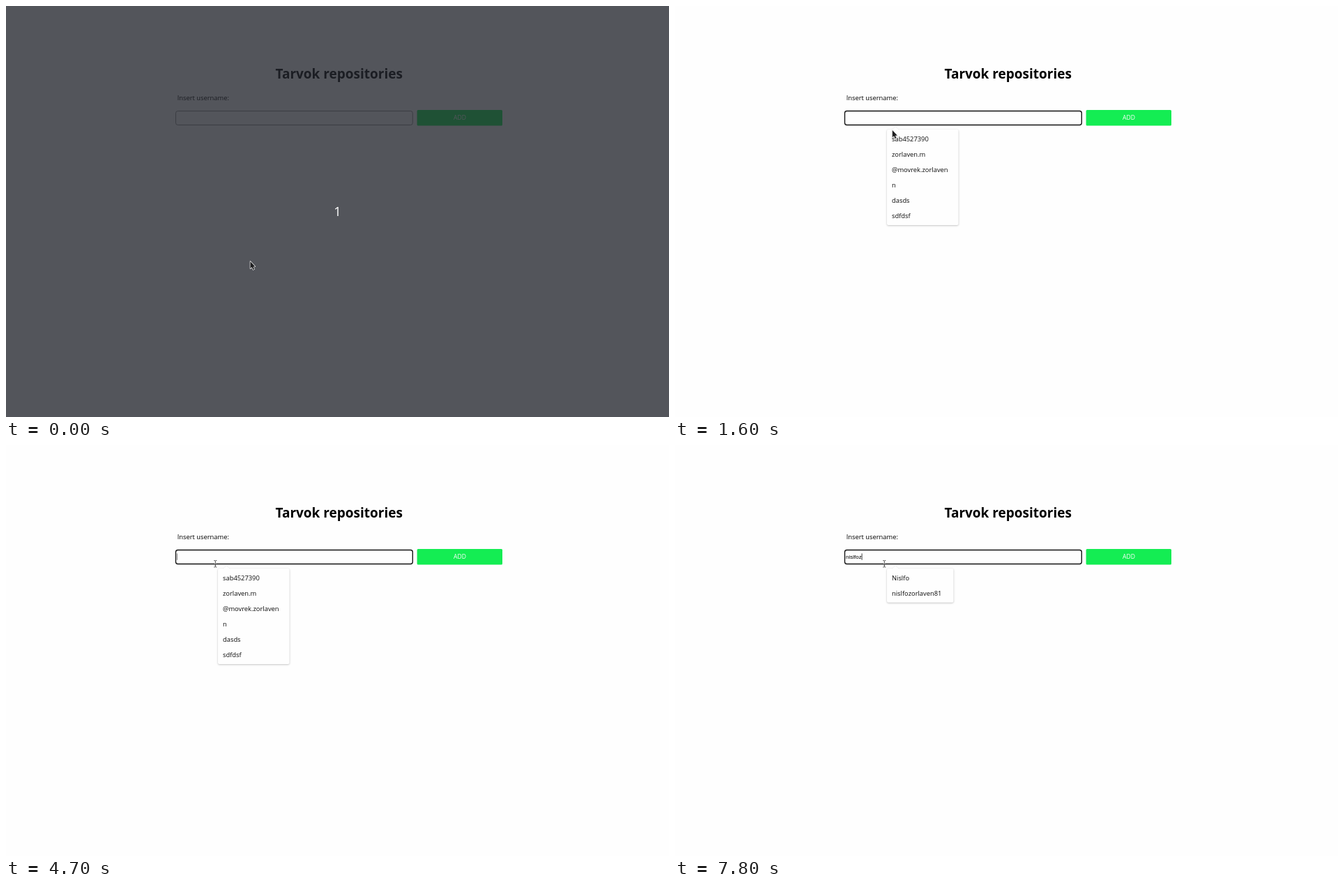
An HTML page with a canvas that plays this animation: 951x589 px, repeating every 8000 ms.

```html
<!DOCTYPE html>
<html lang="en">
<head>
<meta charset="utf-8">
<title>Repositories</title>
<style>
  html, body { margin: 0; width: 100%; height: 100%; overflow: hidden; background: #fefefe; }
  canvas { display: block; }
</style>
</head>
<body>
<canvas id="stage" width="951" height="589"></canvas>
<script>
const ctx = document.getElementById('stage').getContext('2d');
const LOOP = 8000;
const SANS = '"Open Sans", "Noto Sans", sans-serif';
const LABEL = '500 9.35px ' + SANS;
const INPUT = '8px "Liberation Sans", Arial, sans-serif';

const USER = 'nislfozorlaven81';
const ALL = ['sab4527390', 'zorlaven.m', '@movrek.zorlaven', 'n', 'dasds', 'sdfdsf'];
const MATCHES = ['n', 'Nislfo', USER];

// [start ms, value]; each value holds until the next entry
const typed = [[0, 0], [5600, 1], [6400, 2], [6800, 4], [7100, 5], [7400, 6], [7800, 7]];
const caretOn = [[0, false], [1100, true], [1600, false], [2200, true], [2800, false],
  [3500, true], [4100, false], [4700, true], [5400, false], [5600, true]];
const popup = [[0, null], [1200, { items: ALL, width: 102.6 }],
  [5600, { items: MATCHES, width: 95.5 }],
  [6500, { items: MATCHES.slice(1), width: 95.5 }]];

// pointer moves: start, end, from, to
const moves = [
  [100, 400, [350.4, 366], [367, 388.5]],
  [500, 800, [367, 388.5], [283.5, 160]],
  [1200, 1600, [283.5, 160], [311.8, 178]],
  [1900, 2200, [311.8, 178], [300.3, 170.3]]
];

function at(list, t) {
  let value = list[0][1];
  for (const [start, v] of list) if (t >= start) value = v;
  return value;
}

function pointer(t) {
  let pos = moves[0][2];
  for (const [start, end, a, b] of moves) {
    if (t < start) break;
    const p = Math.min(1, (t - start) / (end - start));
    const e = p * p * (3 - 2 * p);
    pos = a.map((v, i) => v + (b[i] - v) * e);
  }
  return pos;
}

function text(str, x, y, font, color, align = 'left') {
  ctx.font = font;
  ctx.fillStyle = color;
  ctx.textAlign = align;
  ctx.fillText(str, x, y);
}

function box(x, y, w, h, r) {
  ctx.beginPath();
  ctx.roundRect(x, y, w, h, r);
}

function shadow(color, blur, dy) {
  ctx.shadowColor = color;
  ctx.shadowBlur = blur;
  ctx.shadowOffsetY = dy;
}

function drawPage(focused) {
  ctx.fillStyle = '#fefefe';
  ctx.fillRect(0, 0, 951, 589);
  text('Tarvok repositories', 477.7, 104, 'bold 19px "Noto Sans", "Open Sans", sans-serif', '#000', 'center');
  text('Insert username:', 245.7, 135.4, LABEL, '#000');

  box(243.5, 150.5, 339.8, 20, 3);
  ctx.fillStyle = '#fefefe';
  ctx.fill();
  ctx.lineWidth = focused ? 1.35 : 0.9;
  ctx.strokeStyle = focused ? '#101010' : '#858585';
  ctx.stroke();

  ctx.fillStyle = '#14ed53';
  box(589.6, 149, 122.4, 22.4, 1.5);
  ctx.fill();
  text('ADD', 651, 163.2, '8.6px ' + SANS, '#fff', 'center');
}

function drawInput(t) {
  const value = USER.slice(0, at(typed, t));
  text(value, 245, 163, INPUT, '#000');
  if (at(caretOn, t)) {
    ctx.fillStyle = value ? '#111' : '#666';
    ctx.fillRect(245 + ctx.measureText(value).width, 155.4, 0.8, 9.4);
  }
}

function drawPopup({ items, width }) {
  const x = 304, y = 177, h = 4.7 + 22.05 * items.length;
  ctx.save();
  shadow('rgba(0,0,0,.27)', 2.5, 0.8);
  ctx.fillStyle = '#fefefe';
  box(x, y, width, h, 2);
  ctx.fill();
  ctx.restore();

  ctx.beginPath();
  ctx.moveTo(311, 177.5);
  ctx.lineTo(316.2, 172.5);
  ctx.lineTo(321.4, 177.5);
  ctx.fillStyle = '#fefefe';
  ctx.fill();
  ctx.lineWidth = 0.6;
  ctx.strokeStyle = 'rgba(0,0,0,.09)';
  ctx.stroke();

  items.forEach((s, i) => text(s, 311, 193.5 + 22.08 * i, LABEL, '#0c0c0c'));
}

function drawArrow(x, y, dimmed) {
  const pts = [[0, 0], [0, 10.3], [2.3, 8.3], [4, 12], [5.7, 11.2], [4.1, 7.7], [7, 7.4]];
  ctx.save();
  ctx.translate(x, y);
  ctx.beginPath();
  pts.forEach(p => ctx.lineTo(...p));
  ctx.closePath();
  ctx.lineJoin = 'round';
  if (!dimmed) shadow('rgba(0,0,0,.3)', 2, 0.8);
  ctx.lineWidth = 1.3;
  ctx.strokeStyle = '#fff';
  ctx.stroke();
  shadow('transparent', 0, 0);
  ctx.fillStyle = '#1d1d1f';
  ctx.fill();
  ctx.restore();
}

function drawBeam(x, y) {
  ctx.save();
  ctx.translate(x, y);
  ctx.beginPath();
  for (const s of [-1, 1]) {
    ctx.moveTo(-2, s * 4.8);
    ctx.lineTo(-0.5, s * 4.6);
    ctx.lineTo(0, s * 4);
    ctx.lineTo(0.5, s * 4.6);
    ctx.lineTo(2, s * 4.8);
  }
  ctx.moveTo(0, -4);
  ctx.lineTo(0, 4);
  ctx.moveTo(-1.2, 1.6);
  ctx.lineTo(1.2, 1.6);
  ctx.lineWidth = 2;
  ctx.strokeStyle = 'rgba(255,255,255,.8)';
  ctx.stroke();
  ctx.lineWidth = 0.85;
  ctx.strokeStyle = '#333';
  ctx.stroke();
  ctx.restore();
}

function drawCountdown() {
  ctx.fillStyle = 'rgba(35,38,46,.78)';
  ctx.fillRect(0, 0, 951, 589);
  text('1', 475.5, 301, '18.5px ' + SANS, '#fff', 'center');
}

function draw(now) {
  const t = Math.floor((now % LOOP) / 100) * 100;
  const dimmed = t < 100;
  const list = at(popup, t);
  const [x, y] = pointer(t);
  const inField = x > 243 && x < 584 && y > 150 && y < 171;

  drawPage(t >= 1100);
  drawInput(t);
  if (list) drawPopup(list);
  if (dimmed) drawCountdown();
  if (inField) drawBeam(x, y);
  else drawArrow(x, y, dimmed);
}

let begin = null;
function tick(now) {
  if (begin === null) begin = now;
  draw(now - begin);
  requestAnimationFrame(tick);
}
draw(0);
requestAnimationFrame(tick);
</script>
</body>
</html>
```
